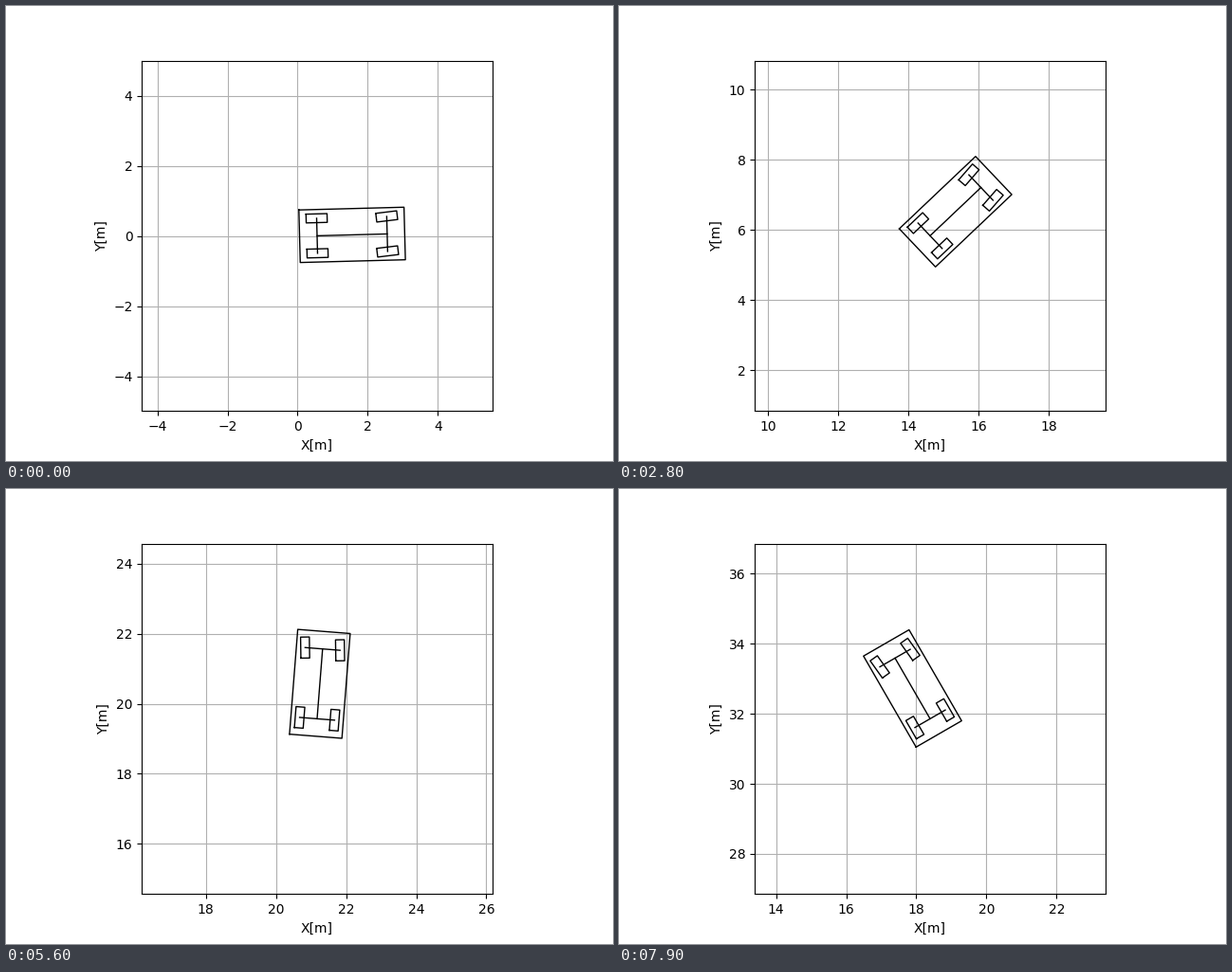
A matplotlib script for the animation above (8 s loop, 640x480 px).

```python
import numpy as np
import matplotlib.pyplot as plt
from matplotlib.animation import FuncAnimation

FRAMES, STEP_S = 80, 0.1
SPEED = 5.56                    # m/s
YAW_RATE = np.radians(15)       # rad/s
WHEEL_BASE = 2.0
HALF_TRACK = 0.5
VIEW = 5.0                      # half width of the visible area
STEER = np.arctan(WHEEL_BASE * YAW_RATE / SPEED)


def box(x0, x1, half_w):
    return np.array([[x0, x1, x1, x0, x0],
                     [half_w, half_w, -half_w, -half_w, half_w]])


def move(points, x, y, yaw=0.0):
    c, s = np.cos(yaw), np.sin(yaw)
    return np.array([[c, -s], [s, c]]) @ points + [[x], [y]]


def vehicle_parts():
    """Outlines in the vehicle frame, rear axle centre at the origin."""
    tire = box(-0.3, 0.3, 0.125)
    parts = [box(-0.5, 2.5, 0.75), np.array([[0, WHEEL_BASE], [0, 0]])]
    for x, steer in ((0, 0), (WHEEL_BASE, STEER)):
        parts.append(np.array([[x, x], [HALF_TRACK, -HALF_TRACK]]))
        parts += [move(tire, x, y, steer) for y in (HALF_TRACK, -HALF_TRACK)]
    return parts


def pose(t):
    """Uniform circular motion starting at the origin along +x."""
    yaw = YAW_RATE * t
    radius = SPEED / YAW_RATE
    return radius * np.sin(yaw), radius * (1 - np.cos(yaw)), yaw


fig, ax = plt.subplots(figsize=(6.4, 4.8), dpi=100)
ax.set_aspect("equal", adjustable="box")
ax.set_xlabel("X[m]")
ax.set_ylabel("Y[m]")
ax.grid(True)

PARTS = vehicle_parts()
lines = [ax.plot([], [], "k", lw=1)[0] for _ in PARTS]


def update(i):
    x, y, yaw = pose((i + 1) * STEP_S)
    for line, part in zip(lines, PARTS):
        line.set_data(*move(part, x, y, yaw))
    ax.set_xlim(x - VIEW, x + VIEW)
    ax.set_ylim(y - VIEW, y + VIEW)
    return lines


anim = FuncAnimation(fig, update, frames=FRAMES, interval=STEP_S * 1000,
                     repeat=True, repeat_delay=0, blit=False)
plt.show()
```
